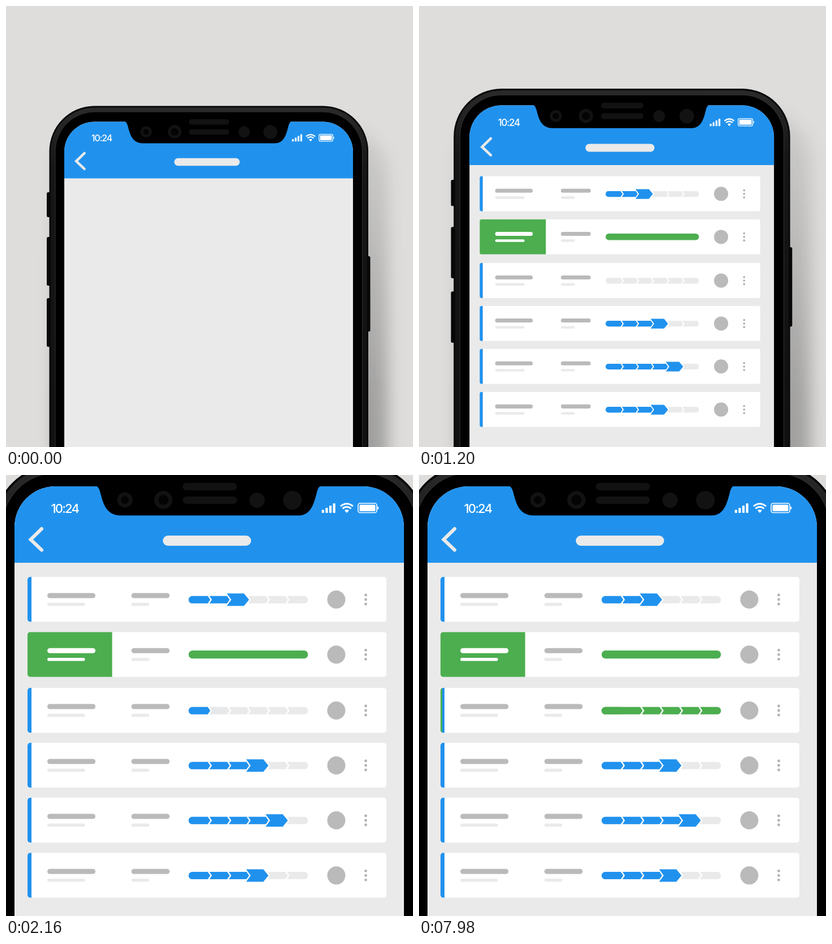
Write an HTML page that moves like this. It is 719 by 779 pixels and loops after 8000 ms.

```html
<!DOCTYPE html>
<html lang="en">
<head>
<meta charset="utf-8">
<title>Task list on a phone</title>
<style>
html, body { margin: 0; width: 100%; height: 100%; overflow: hidden; background: #dedddc; }
svg { display: block; width: 100vw; height: 100vh; }
text { font: 500 22px Inter, Roboto, sans-serif; letter-spacing: -1.8px; }
</style>
</head>
<body>
<svg viewBox="0 0 719 779" xmlns="http://www.w3.org/2000/svg">
  <defs>
    <linearGradient id="shade" x1="0" y1="0" x2="0" y2="1">
      <stop offset="0" stop-opacity=".07"/>
      <stop offset=".6" stop-opacity=".27"/>
      <stop offset="1" stop-opacity=".3"/>
    </linearGradient>
    <linearGradient id="rim" x1="0" y1="0" x2="0" y2="1">
      <stop offset="0" stop-color="#2a2a2a"/>
      <stop offset=".12" stop-color="#161616"/>
      <stop offset="1" stop-color="#0d0d0d"/>
    </linearGradient>
    <filter id="blur" x="-20%" y="-20%" width="140%" height="140%"><feGaussianBlur stdDeviation="14"/></filter>
    <clipPath id="screen"><rect x="15" y="20" width="688" height="1200" rx="72"/></clipPath>
    <clipPath id="card"><rect x="38" width="634" height="79.5" rx="5"/></clipPath>
  </defs>
  <g id="camera">
    <rect x="-20" y="-20" width="760" height="820" fill="#dedddc"/>
    <rect x="86" y="215" width="588" height="800" rx="80" fill="url(#shade)" filter="url(#blur)"/>
    <g fill="#080808">
      <rect x="72" y="329" width="10" height="44" rx="2.5"/>
      <rect x="72" y="408" width="10" height="86" rx="2.5"/>
      <rect x="72" y="516" width="10" height="86" rx="2.5"/>
      <rect x="633" y="442" width="10.5" height="133" rx="2.5"/>
      <rect x="76.500" y="176.500" width="563.500" height="900" rx="80"/>
    </g>
    <rect x="79" y="179.500" width="558.500" height="900" rx="77.500" fill="url(#rim)"/>
    <rect x="87" y="187" width="542.500" height="900" rx="70" stroke="#303030" stroke-width="1"/>
    <g transform="matrix(.7413 0 0 .7413 91.85 189.55)">
      <g clip-path="url(#screen)">
        <rect y="15" width="719" height="1200" fill="#eaeaea"/>
        <rect y="15" width="719" height="140" fill="#2092ee"/>
      </g>
      <path d="M157 18Q163.500 20 166 29C171 47 175 71.500 203 71.500H517C540 71.500 545 47 549.500 29Q552 20 558 18Z"/>
      <g fill="#121212">
        <rect x="312" y="14" width="96" height="13" rx="6.500"/>
        <rect x="312" y="38" width="96" height="13" rx="6.500"/>
        <circle cx="210" cy="44" r="13.500"/>
        <circle cx="278" cy="44" r="16"/>
        <circle cx="443.500" cy="44.500" r="13.500"/>
        <circle cx="506" cy="44.500" r="16.500"/>
      </g>
      <g fill="#040404">
        <circle cx="210" cy="44" r="7"/>
        <circle cx="278" cy="44" r="9"/>
      </g>
      <g fill="#fff">
        <text x="79.500" y="66.500">10:24</text>
        <rect x="557.800" y="61.500" width="4.200" height="5.500" rx="1"/>
        <rect x="564.400" y="58" width="4.200" height="9" rx="1"/>
        <rect x="571" y="54" width="4.200" height="13" rx="1"/>
        <rect x="577.600" y="50" width="4.200" height="17" rx="1"/>
        <path d="M602 67L598 62.500Q602 59.500 606 62.500Z"/>
        <path d="M594.500 59.200Q602 53.200 609.500 59.200M591 55.200Q602 46.200 613 55.200" fill="none" stroke="#fff" stroke-width="3"/>
        <rect x="622" y="50" width="33" height="16.500" rx="3.500" fill="none" stroke="#fff" stroke-width="1.600"/>
        <rect x="624.500" y="52.500" width="28" height="11.500" rx="1.500"/>
        <path d="M656.300 55.500Q658.300 55.500 658.300 58.250Q658.300 61 656.300 61Z"/>
      </g>
      <path d="M63 95L43.500 114L63 132.500" fill="none" stroke="#eaeaea" stroke-width="6" stroke-linecap="round"/>
      <rect x="277" y="107" width="156" height="18" rx="9" fill="#eaeaea"/>
      <g id="list"></g>
    </g>
  </g>
</svg>
<script>
const LOOP = 8000, ZOOM = 1.349, MID = 40.3;
const BLUE = [32, 146, 238], GREEN = [76, 174, 79];
const GREY = '#eaeaea', DARK = '#bababa';
const rgb = c => `rgb(${c.map(Math.round)})`;
const $ = id => document.getElementById(id);

// Card tops and the number of the current step; 0 is empty, 7 is complete.
const cards = [[180, 3], [277.3, 7], [376, 0], [473, 4], [570, 5], [667.3, 4]];

const ramp = (t, from, length) => Math.min(1, Math.max(0, (t - from) / length));
const easeInOut = (u, p) => u < .5 ? 2 ** (p - 1) * u ** p : 1 - 2 ** (p - 1) * (1 - u) ** p;

// One chevron of the bar; grow = 1 makes it the large current step.
function step(k, grow = 0) {
  const base = 325.25 + 34.25 * (k - 1), half = 6.5 + 4.5 * grow;
  const left = base - 3.75 * grow, tip = base + 35.6;
  const top = MID - half, bottom = MID + half;
  const shoulder = tip - 4.5 - 4.5 * grow;
  const start = k === 1
    ? `M329 ${top}A6.5 6.5 0 0 0 329 ${bottom}`
    : `M${left} ${top}L${base + 4.3} ${MID}L${left} ${bottom}`;
  const end = k === 6
    ? `H527A6.5 6.5 0 0 0 527 ${top}Z`
    : `H${shoulder}L${tip} ${MID}L${shoulder} ${top}Z`;
  return start + end;
}

const bar = (x, y, w, h, fill) =>
  `<rect x="${x}" y="${y}" width="${w}" height="${h}" rx="${h / 2}" fill="${fill}"/>`;
const steps = [1, 2, 3, 4, 5, 6];

function progress(row, now) {
  if (now === 7) return bar(322.5, 32.6, 211, 14.4, rgb(GREEN));
  const grey = `<path d="${steps.map(k => step(k)).join('')}" fill="${GREY}"/>`;
  if (row === 2) return grey + steps.map(k => `<path id="step${k}"/>`).join('') +
    `<rect id="fill" x="322.5" y="33.8" height="13" rx="6.5" fill="${rgb(GREEN)}"/>` +
    `<g id="alert"><circle cx="545" cy="40.7" r="6.7" fill="#c9473a"/>` +
    `<path d="M545 36.8V41.3M545 43.6V45" stroke="#fff" stroke-width="1.7"/></g>`;
  const lit = steps.slice(0, now).map(k => step(k, +(k === now))).join('');
  return grey + `<path d="${lit}" fill="${rgb(BLUE)}"/>`;
}

function card([y, now], row) {
  const done = now === 7;
  const side = `<rect x="38" width="${done ? 149.5 : 7}" height="79.5" fill="${rgb(done ? GREEN : BLUE)}"/>`;
  const panel = row === 2 ? `<rect id="panel" x="38" height="79.5" fill="${rgb(GREEN)}"/>` : '';
  const dots = [32, 40, 48].map(cy => `<circle cx="635.5" cy="${cy}" r="2.4" fill="#b2b2b2"/>`).join('');
  return `<g id="card${row}"><g clip-path="url(#card)">
    <rect x="38" width="634" height="79.5" fill="#fff"/>${side}${panel}</g>` +
    bar(73, 28.5, 85, 9, done ? '#fff' : DARK) + bar(73, 45.7, 66.5, 5.6, done ? '#fff' : GREY) +
    bar(221.5, 28.5, 67.5, 9, DARK) + bar(221.5, 45.7, 31.5, 5.6, GREY) +
    progress(row, now) + `<circle cx="583.5" cy="40" r="16" fill="${DARK}"/>${dots}</g>`;
}
$('list').innerHTML = cards.map(card).join('');

// When each step of the third card lights up, and when the next one takes over.
const lights = [2100, 2160, 2490, 2820, 6090, 6240];

function drawSteps(t) {
  steps.forEach((k, i) => {
    const path = $('step' + k), edge = k === 1 || k === 6;
    const on = k === 1 ? +(t >= 2160) : ramp(t, lights[i], 60);
    const shrink = edge ? 1 : ramp(t, lights[i + 1] - 30, 60);
    const green = ramp(t, 7650 + 30 * i, 150);
    path.setAttribute('d', step(k, edge ? 0 : on * (1 - shrink)));
    path.setAttribute('opacity', on);
    path.setAttribute('fill', rgb(BLUE.map((c, j) => c + (GREEN[j] - c) * green)));
  });
  const finish = ramp(t, 7880, 100) ** 2;
  $('fill').setAttribute('width', 44 * finish);
  $('panel').setAttribute('width', 3 * finish);
  const alert = easeInOut(ramp(t, 3510, 900), 2) * (1 - ramp(t, 6060, 240));
  $('alert').setAttribute('opacity', alert);
}

function draw(t) {
  const p = easeInOut(ramp(t, 885, 930), 3);
  const scale = 1 + (ZOOM - 1) * p;
  $('camera').setAttribute('transform', `matrix(${scale} 0 0 ${scale} ${-123.9 * p} ${-255.7 * p})`);
  cards.forEach(([y], i) => {
    const rest = 1 - easeInOut(ramp(t, 4 + 69 * i, 430), 2.6);
    $('card' + i).setAttribute('transform', `translate(0 ${y + 480 * ZOOM * rest})`);
  });
  drawSteps(t);
}

function tick() {
  draw(performance.now() % LOOP);
  requestAnimationFrame(tick);
}
tick();
</script>
</body>
</html>
```
